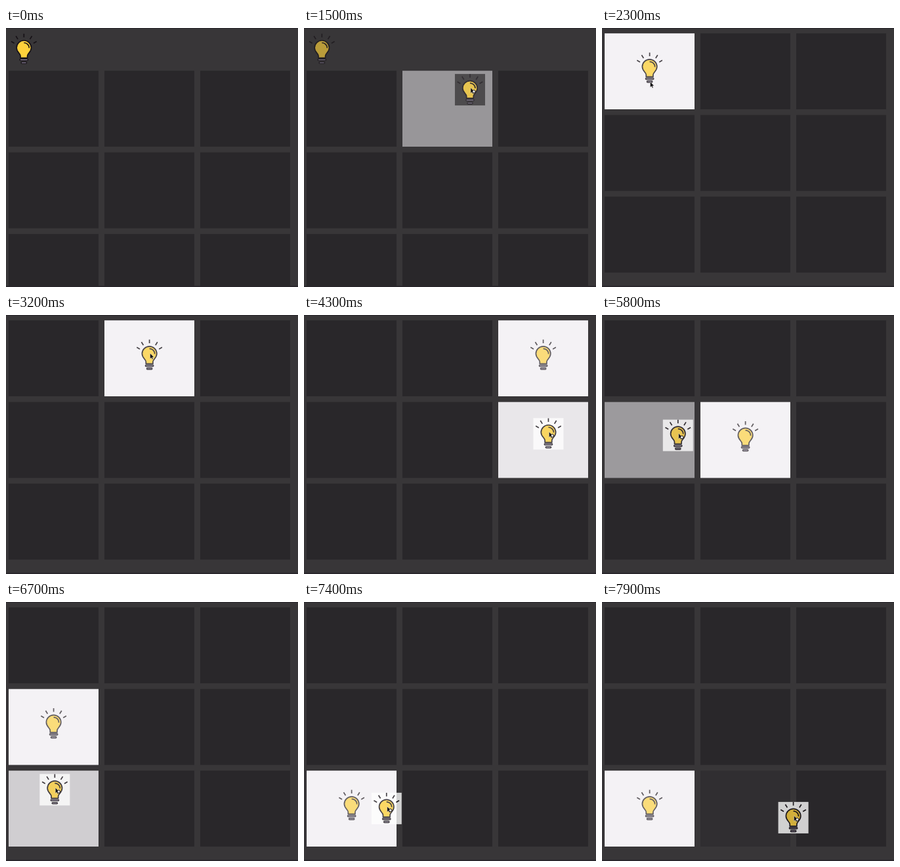
Write an HTML page that moves like this. It is 445 by 395 pixels and loops after 8000 ms.

```html
<!DOCTYPE html>
<html lang="en">
<head>
<meta charset="utf-8">
<title>Drag the bulb</title>
<style>
  html, body { margin: 0; width: 100%; height: 100%; overflow: hidden; background: #383638; }
  svg { display: block; width: 445px; height: 395px; }
</style>
</head>
<body>
<svg viewBox="0 0 445 395">
  <defs>
    <g id="bulb" stroke="#171217" stroke-width="1.7" stroke-linejoin="round" fill="none">
      <path d="M0 -23.8V-18.3M9.2 -15.4L12.2 -20.2M-9.2 -15.4L-12.2 -20.2M14.6 -9.3L19.3 -12.1M-14.6 -9.3L-19.3 -12.1"/>
      <path fill="#fed13c" d="M-5.3 13V10C-5.3 6 -11.2 4.5 -11.2 -2.3A11.2 11.2 0 0 1 11.2 -2.3C11.2 4.5 5.3 6 5.3 10V13Z"/>
      <path d="M0 -10A7.8 7.8 0 0 1 8 -2"/>
      <g fill="#a59bb8" stroke-width="1.4">
        <rect x="-6.2" y="14.8" width="12.4" height="2.3" rx="1.1"/>
        <rect x="-4.2" y="19.4" width="8.4" height="2.2" rx="1.1"/>
      </g>
    </g>
  </defs>
  <g id="grid"></g>
  <use id="resting" href="#bulb"/>
  <g id="ghost" opacity=".78">
    <rect id="paper" x="-23" y="-24" width="46" height="48"/>
    <use href="#bulb"/>
  </g>
  <g id="cursor">
    <path d="M0 0V8.4L2 6.6L3.2 9.4L4.6 8.8L3.4 6.1H6Z" fill="#0c0a0c" stroke="#fff" stroke-width=".4"/>
    <circle id="badge" cx="5" cy="5.8" r="2.2" fill="#eee" stroke="#1a171a"/>
  </g>
  <path d="M0 0H445V1H0ZM0 393.3H445V395H0Z" fill="#29262b"/>
</svg>
<script>
const LOOP = 8000, FADE = 200, STEP = 4, SHIFT = 57, HEADER = -1;
const CELL = { width: 137, height: 115.8 };
const DARK = [41, 39, 42], LIGHT = [244, 242, 245];
const GRIP = [1, -3];
const ENTRY = { time: 100, at: [20, 42] };
const $ = id => document.getElementById(id);

// One row per drag: start cell, press time, drop time, carried dx, dy, sideways bow
const drags = [
  [HEADER, 850, 1780, 45, 88, 240],
  [0, 2650, 2900, 146, 0],
  [1, 3280, 3600, 146, 0],
  [2, 3800, 4310, 8, 122],
  [5, 4650, 5000, -146, 0],
  [4, 5310, 5950, -134, -3],
  [3, 6064, 6800, 2, 116],
  [6, 7300, 7716, 219, 18.5]
].map(([cell, press, drop, dx, dy, bow = 0]) => ({ cell, press, drop, dx, dy, bow }));

const clamp = v => Math.max(0, Math.min(1, v));
const add = (a, b) => [a[0] + b[0], a[1] + b[1]];
const mix = (a, b, u) => a.map((v, k) => v + (b[k] - v) * u);
const cellX = i => 4 + 146 * (i % 3);
const cellY = i => 8.2 + 124.5 * Math.floor(i / 3);
const home = i => i === HEADER ? [27.3, 32.5] : [cellX(i) + 68.6, cellY(i) + 53.2];
const place = (el, [x, y]) => el.setAttribute("transform", `translate(${x} ${y})`);
const show = (el, on) => el.setAttribute("visibility", on ? "visible" : "hidden");

const cells = Array.from({ length: 9 }, (_, i) => {
  const r = document.createElementNS("http://www.w3.org/2000/svg", "rect");
  const box = { x: cellX(i), y: cellY(i), ...CELL };
  for (const k in box) r.setAttribute(k, box[k]);
  return $("grid").appendChild(r);
});

function carried(d, t) {
  const u = clamp((t - d.press) / (d.drop - d.press));
  return [d.dx * u + d.bow * Math.sin(Math.PI * u), d.dy * u];
}

// Pointer tip, bulb cell and carried distance at time t
function scene(t) {
  const found = drags.findIndex(d => t < d.drop);
  const n = found < 0 ? drags.length - 1 : found;
  const d = drags[n], last = drags[n - 1];
  const dragging = t >= d.press, move = carried(d, t);
  const grab = add(home(d.cell), GRIP);
  let tip = add(grab, move);
  if (!dragging) {
    const from = last ? add(add(home(last.cell), GRIP), [last.dx, last.dy]) : ENTRY.at;
    const since = last ? last.drop : ENTRY.time;
    tip = mix(from, grab, clamp((t - since) / (d.press - since)));
  }
  return { cell: d.cell, dragging, move, tip, top: d.cell === HEADER ? SHIFT : 0 };
}

function isLit(i, s) {
  const x = s.tip[0] - cellX(i), y = s.tip[1] - cellY(i) - s.top;
  const over = x >= 0 && x < CELL.width && y >= 0 && y < CELL.height;
  return s.cell === i || s.dragging && over;
}

// Each cell brightens while lit and darkens otherwise
function glows(t) {
  const levels = cells.map(() => 0);
  for (let time = 0; time < t; time += STEP) {
    const s = scene(time), change = Math.min(STEP, t - time) / FADE;
    levels.forEach((v, i) => levels[i] = clamp(v + (isLit(i, s) ? change : -change)));
  }
  return levels;
}

function draw(t) {
  const { cell, dragging, move, tip, top } = scene(t);
  const inHeader = cell === HEADER, spot = home(cell);

  place($("grid"), [0, top]);
  glows(t).forEach((g, i) =>
    cells[i].setAttribute("fill", `rgb(${mix(DARK, LIGHT, g).map(Math.round)})`));

  place($("resting"), spot);
  $("resting").setAttribute("opacity", dragging ? .66 : inHeader ? 1 : .77);

  show($("ghost"), dragging);
  place($("ghost"), add(spot, move));
  $("paper").setAttribute("fill", inHeader ? "#383638" : "#fff");

  show($("cursor"), t >= ENTRY.time);
  show($("badge"), dragging);
  place($("cursor"), tip);
}

const start = performance.now();
function tick() {
  draw((performance.now() - start) % LOOP);
  requestAnimationFrame(tick);
}
tick();
</script>
</body>
</html>
```
